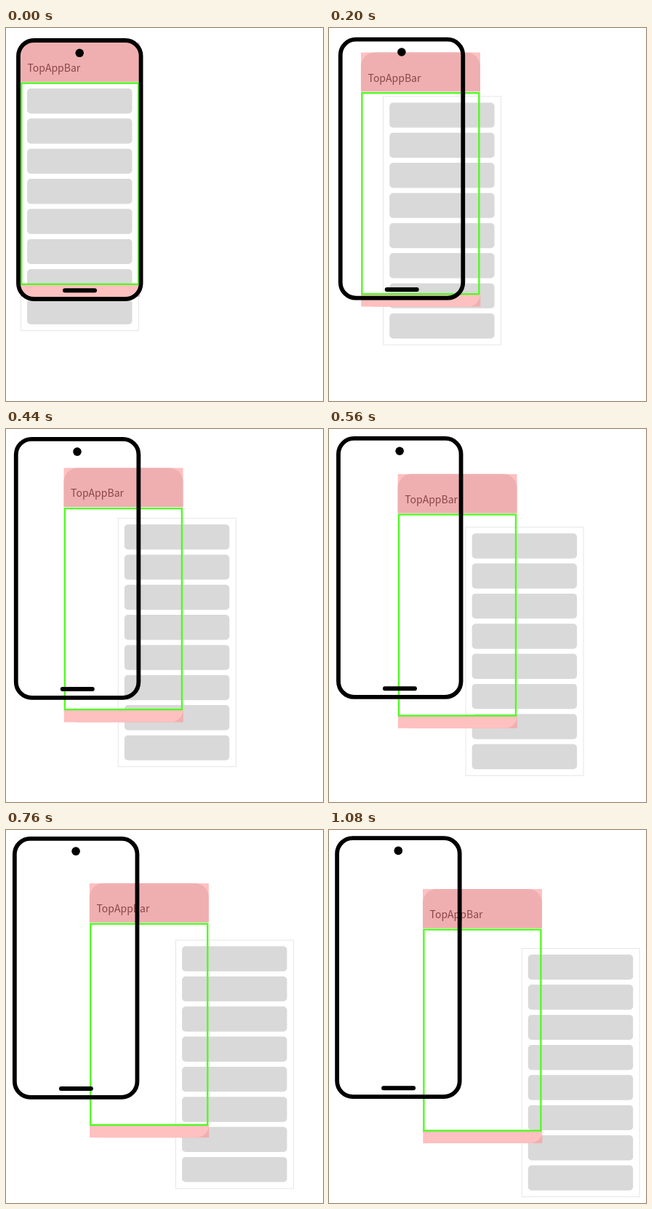
Recreate the animation shown at these times as an HTML page. Size 436 by 512 pixels, loop 1160 ms.

```html
<!DOCTYPE html>
<html lang="en">
<head>
<meta charset="utf-8">
<title>Layers sliding apart</title>
<style>
  html, body { margin: 0; width: 100%; height: 100%; overflow: hidden; background: #fff; }
  svg { display: block; }
  text { font: 14px "Noto Sans CJK JP", "Noto Sans", sans-serif; fill: #8b4549; }
</style>
</head>
<body>
<svg width="436" height="512" viewBox="0 0 436 512">
  <g id="list">
    <rect x=".5" y=".5" width="162" height="341" fill="#fff" stroke="#e6e6e6"/>
  </g>

  <g id="scaffold">
    <rect width="164" height="53.6" fill="#ffc0c0"/>
    <path d="M0 53.6V19a19 19 0 0 1 19-19H145a19 19 0 0 1 19 19V53.6z" fill="#efafb1"/>
    <text x="9.6" y="40">TopAppBar</text>
    <!-- the outer corners of the bottom bar let the list show through -->
    <path d="M.3 331.5H164.3V349H.3z" fill="#ff9292" fill-opacity=".58"/>
    <path d="M.3 331.5H164.3A17.5 17.5 0 0 1 146.8 349H17.8A17.5 17.5 0 0 1 .3 331.5z" fill="#ffc0c0"/>
    <rect x="1.4" y="55.6" width="161" height="276" fill="none" stroke="#52fa23" stroke-width="2.4"/>
  </g>

  <g id="phone">
    <rect x="3" y="3" width="168.6" height="355" rx="21.5" fill="none" stroke="#000" stroke-width="5.8"/>
    <circle cx="87.2" cy="20.3" r="5.8"/>
    <rect x="64" y="343.2" width="47" height="6" rx="3"/>
  </g>
</svg>
<script>
  const LOOP = 1160, STEP = 40, START = 60, DURATION = 1000;

  // start and end position of each layer
  const layers = [
    { id: "list", from: [20, 74], to: [264.7, 162] },
    { id: "scaffold", from: [19.8, 20.1], to: [129, 81.1] },
    { id: "phone", from: [14, 14], to: [8.1, 8.1] }
  ];
  for (const layer of layers) layer.node = document.getElementById(layer.id);

  for (let i = 0; i < 8; i++) {
    const row = document.createElementNS("http://www.w3.org/2000/svg", "rect");
    const box = { x: 9.1, y: 9 + i * 41.33, width: 144.4, height: 34.4, rx: 5, fill: "#d9d9d9" };
    for (const key in box) row.setAttribute(key, box[key]);
    layers[0].node.append(row);
  }

  // cubic-bezier(0, 0, .58, 1)
  function easeOut(x) {
    let low = 0, high = 1;
    for (let i = 0; i < 24; i++) {
      const s = (low + high) / 2;
      if (s * s * (1.74 - 0.74 * s) < x) low = s; else high = s;
    }
    return low * low * (3 - 2 * low);
  }

  function draw(time) {
    const tick = Math.floor(time % LOOP / STEP) * STEP;
    const p = easeOut(Math.min(1, Math.max(0, (tick - START) / DURATION)));
    for (const { node, from, to } of layers) {
      const [x, y] = from.map((v, i) => v + (to[i] - v) * p);
      node.setAttribute("transform", `translate(${x.toFixed(3)} ${y.toFixed(3)})`);
    }
  }

  const begin = performance.now();
  function frame() {
    draw(performance.now() - begin);
    requestAnimationFrame(frame);
  }
  frame();
</script>
</body>
</html>
```
